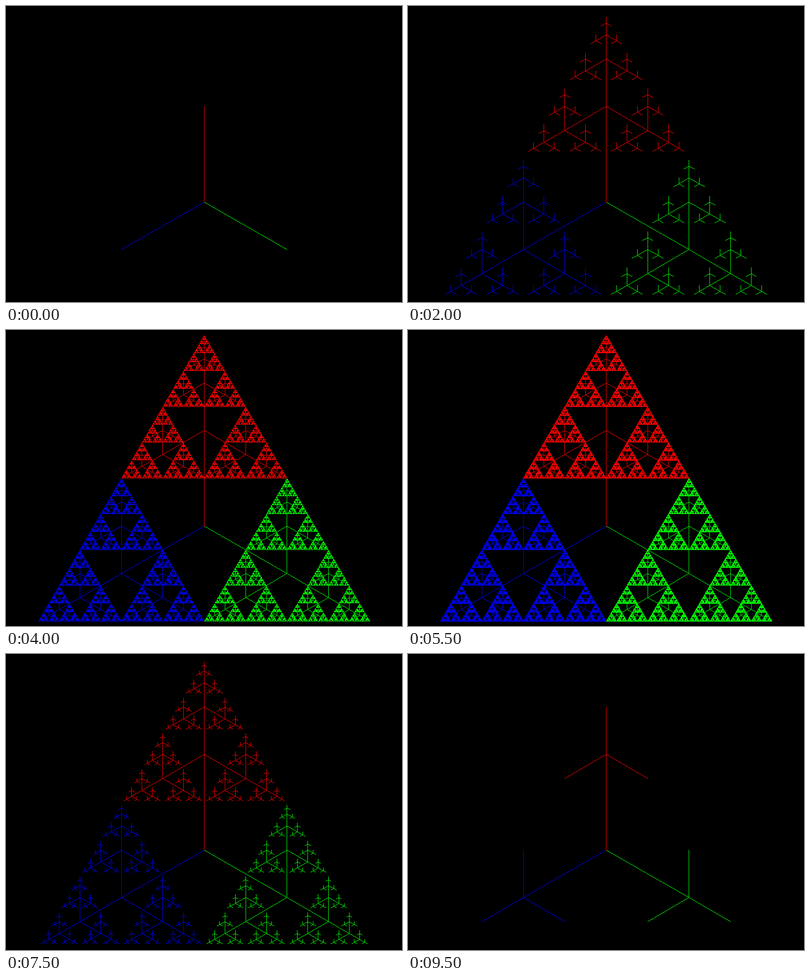
Animation, 800 px wide and 600 px high, one loop 10 s. Source, as an HTML page with a canvas:

```html
<!DOCTYPE html>
<html lang="en">
<head>
<meta charset="utf-8">
<title>Fractal tree</title>
<style>
  html, body { margin: 0; width: 100%; height: 100%; overflow: hidden; background: #000; }
  canvas { display: block; }
</style>
</head>
<body>
<canvas id="stage" width="800" height="600"></canvas>
<script>
const W = 800, H = 600, STEP = 500, STEPS = 20;
const HEIGHT = 580, TOP = 10;
const RED = 0xff0000ff, GREEN = 0xff00ff00, BLUE = 0xffff0000, BLACK = 0xff000000;
const COS = Math.sqrt(3) / 2;
const DIRS = [[-COS, 0.5, BLUE], [COS, 0.5, GREEN], [0, -1, RED]];

const ctx = document.getElementById('stage').getContext('2d');
const image = ctx.createImageData(W, H);
const pixels = new Uint32Array(image.data.buffer);

// One-pixel line without smoothing
function line(x0, y0, x1, y1, color) {
  const dx = Math.abs(x1 - x0), dy = Math.abs(y1 - y0);
  const sx = x0 < x1 ? 1 : -1, sy = y0 < y1 ? 1 : -1;
  let err = dx - dy;
  for (;;) {
    pixels[y0 * W + x0] = color;
    if (x0 === x1 && y0 === y1) return;
    const twice = 2 * err;
    if (twice > -dy) { err -= dy; x0 += sx; }
    if (twice < dx) { err += dx; y0 += sy; }
  }
}

function branch(x, y, length, depth, color) {
  if (!depth) return;
  for (const [dx, dy, own] of DIRS) {
    const c = color || own;
    const nx = x + dx * length, ny = y + dy * length;
    line(Math.round(x), Math.round(y), Math.round(nx), Math.round(ny), c);
    branch(nx, ny, length / 2, depth - 1, c);
  }
}

function draw(depth) {
  pixels.fill(BLACK);
  branch(W / 2, TOP + HEIGHT * 2 / 3, HEIGHT / 3, depth);
  ctx.putImageData(image, 0, 0);
}

// Depth climbs from 1 to 11 and back
let shown = 0;
const start = performance.now();
function tick() {
  const step = Math.floor((performance.now() - start) / STEP) % STEPS;
  const depth = 1 + Math.min(step, STEPS - step);
  if (depth !== shown) draw(shown = depth);
  requestAnimationFrame(tick);
}
tick();
</script>
</body>
</html>
```
